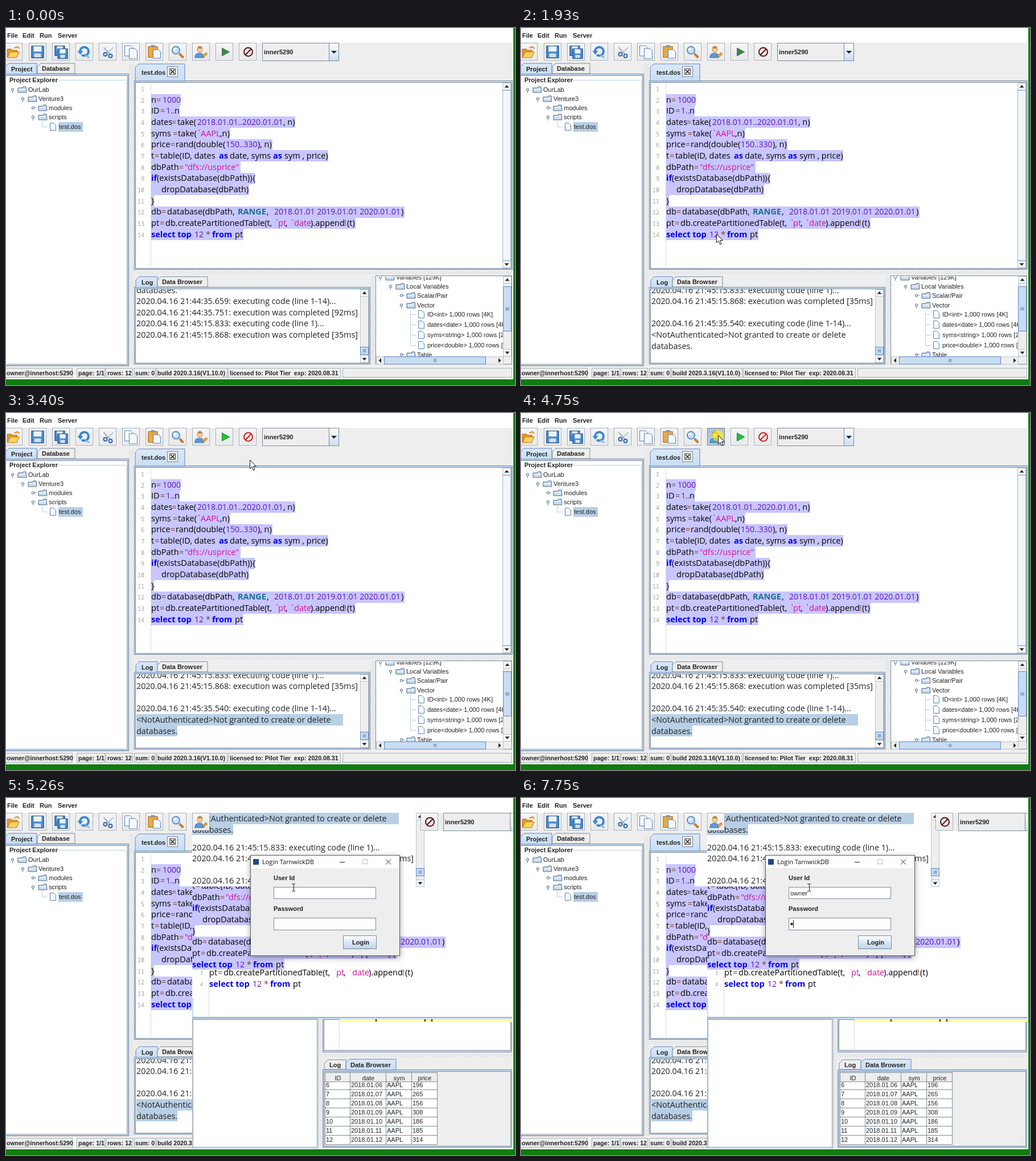
These frames come from a looping animation (894 px wide and 626 px high, 8 s). An HTML page with a canvas:

```html
<!DOCTYPE html>
<html lang="en">
<head>
<meta charset="utf-8">
<title>Code editor login</title>
<style>
html, body { margin: 0; width: 100%; height: 100%; overflow: hidden; background: #fff; }
canvas { display: block; }
</style>
</head>
<body>
<canvas id="stage" width="894" height="626"></canvas>
<script>
const g = document.getElementById('stage').getContext('2d');
const LOOP = 8000;
const FACE = '"Liberation Sans", Arial, sans-serif';
const UI = '11px ' + FACE, BOLD = 'bold ' + UI, STATUS = 'bold 10.6px ' + FACE;
const READ = '"Open Sans", "Noto Sans", sans-serif';
const MONO = '"Noto Sans Mono", "DejaVu Sans Mono", monospace';
const GREY = '#eeeeee', EDGE = '#7a8a99', PALE = '#c8ddf2', SELECT = '#b8cfe5', BLUE = '#6382bf';
const USER = 'owner';

// times of the events, in ms
const RUN = [1460, 1540], DRAG = [2310, 2550], LOGIN = [4750, 4870];
const SELECTED = 2470, REFRESH = 2310, FOCUS = 5660, LEAVE = 7220, ENTER = 7290, DOT = 7750;
const during = (t, [a, b]) => t >= a && t < b;

// ---------- drawing helpers ----------
function fill(x, y, w, h, color) { g.fillStyle = color; g.fillRect(x, y, w, h); }
function box(x, y, w, h, color, edge = EDGE) {
  if (color) fill(x, y, w, h, color);
  g.strokeStyle = edge; g.lineWidth = 1;
  g.strokeRect(x + .5, y + .5, w - 1, h - 1);
}
function text(s, x, y, font = UI, color = '#222', align = 'left') {
  g.font = font; g.fillStyle = color; g.textAlign = align;
  g.fillText(s, x, y);
}
function poly(pts, color, edge, width = 1) {
  g.beginPath();
  for (let i = 0; i < pts.length; i += 2) g.lineTo(pts[i], pts[i + 1]);
  if (color) { g.closePath(); g.fillStyle = color; g.fill(); }
  if (edge) { g.strokeStyle = edge; g.lineWidth = width; g.stroke(); }
}
function disc(x, y, r, color, edge, width = 1) {
  g.beginPath(); g.arc(x, y, r, 0, 7);
  if (color) { g.fillStyle = color; g.fill(); }
  if (edge) { g.strokeStyle = edge; g.lineWidth = width; g.stroke(); }
}
function shade(y, h, top, bottom) {
  const s = g.createLinearGradient(0, y, 0, y + h);
  s.addColorStop(0, top); s.addColorStop(1, bottom);
  return s;
}
function clip(x, y, w, h, draw) {
  g.save(); g.beginPath(); g.rect(x, y, w, h); g.clip();
  draw(); g.restore();
}
function at(x, y, draw) { g.save(); g.translate(x, y); draw(); g.restore(); }

const bumps = (() => {
  const tile = document.createElement('canvas');
  tile.width = tile.height = 4;
  const p = tile.getContext('2d');
  p.fillStyle = GREY; p.fillRect(0, 0, 4, 4);
  p.fillStyle = '#fff'; p.fillRect(0, 0, 1, 1); p.fillRect(2, 2, 1, 1);
  p.fillStyle = '#a9b4bf'; p.fillRect(1, 1, 1, 1); p.fillRect(3, 3, 1, 1);
  return g.createPattern(tile, 'repeat');
})();

// ---------- toolbar icons, centred on 0,0 ----------
function page(x, y, w, h) {
  poly([x, y, x + w - 4, y, x + w, y + 4, x + w, y + h, x, y + h, x, y], '#f4f9ff', '#5a82b4');
}
function floppy(x, y, s) {
  box(x, y, s, s, '#4a8acb', '#1f4d86');
  fill(x + 4, y + 1, s - 8, s * .42, '#eaf3fc');
  fill(x + 5, y + s * .62, s - 10, s * .3, '#d5dfea');
}
const icons = [
  () => {
    poly([-11, 9, -11, -5, -4, -5, -2, -3, 6, -3, 6, 9], '#e89b25', '#a8660c');
    poly([-11, 10, -6, 0, 10, 0, 5, 10, -11, 10], '#ffd163', '#b87912');
    poly([1, -7, 7, -9, 10, -6], null, '#e88a10', 2);
  },
  () => floppy(-11, -11, 22),
  () => { floppy(-11, -11, 18); floppy(-6, -6, 18); },
  () => {
    g.beginPath(); g.arc(0, -1, 7.5, Math.PI, 2.2); g.strokeStyle = '#3d87d2'; g.lineWidth = 4; g.stroke();
    poly([-12, -2, -2, -2, -7, 5], '#3d87d2');
    poly([2, 6, 9, 10], null, '#8db8e4', 3);
  },
  () => {
    poly([-7, -8, 5, 5], null, '#8a9caf', 1.5); poly([10, -8, -2, 3], null, '#a5b4c4', 1.5);
    disc(-4, 4, 3, null, '#3568a8', 2); disc(5, 7, 3, null, '#3568a8', 2);
  },
  () => { page(-11, -11, 14, 18); page(-3, -6, 14, 18); },
  () => {
    box(-11, -10, 17, 20, '#eaa942', '#a86d16');
    fill(-6, -12, 7, 4, '#8a97a6'); page(-2, -4, 13, 15);
  },
  () => {
    poly([3, 3, 10, 10], null, '#c77d28', 4);
    disc(-3, -3, 6.5, '#c4e2fa', '#5b8fc4', 2); disc(-5, -5, 2.5, '#fff');
  },
  () => {
    poly([-11, 10, -9, 4, -4, 2, 2, 3, 5, 10], '#5b9ad8', '#3a70ab');
    disc(-2, -4, 4.5, '#f7cf9c', '#bb8440');
    g.beginPath(); g.arc(-2, -6, 4.5, Math.PI, 0); g.fillStyle = '#c58a35'; g.fill();
    poly([3, 6, 9, 1, 11, 4, 5, 9], '#f0a83c', '#b56e14');
  }
];
function play(bright) {
  poly([-4, -7, 9, 0, -4, 7, -4, -7], bright ? '#27bf35' : '#3a8a3d', bright ? '#128a20' : '#59695a');
}
function stop(bright) {
  const c = bright ? '#cf2020' : '#5d1616';
  disc(1, 0, 7.5, '#f3e9e6', c, 2); poly([-4, 5, 6, -5], null, c, 2);
}
function button(x, draw, mouse, pressed) {
  const over = mouse && mouse[0] >= x && mouse[0] < x + 31 && mouse[1] >= 26 && mouse[1] < 58;
  box(x, 26, 31, 31, pressed ? shade(26, 31, '#a9c0d8', '#bccfe2') : shade(26, 31, '#f5f6f8', '#e6e8eb'), over ? EDGE : '#a3aab2');
  if (!pressed) box(x + 1, 27, 29, 29, null, over ? SELECT : '#fafafa');
  at(x + 15.5, 42, draw);
}
function combo(x) {
  box(x, 26, 135, 32, GREY);
  box(x + 117, 26, 18, 32, shade(26, 32, '#fff', PALE));
  poly([x + 121, 40, x + 131, 40, x + 126, 45], '#222');
  text('inner5290', x + 3, 46, BOLD);
}

// ---------- widgets ----------
function tab(x, y, w, h, label, tx, on) {
  poly([x, y + h, x, y + 6, x + 6, y, x + w, y, x + w, y + h], on ? shade(y, h, '#dbe9f7', PALE) : GREY, on ? BLUE : EDGE);
  text(label, tx, y + h / 2 + 4, BOLD);
}
function panel(x, y, w, h, color = '#fff') {
  box(x, y, w, h, PALE, EDGE);
  box(x + 2, y + 3, w - 4, h - 5, color, EDGE);
}
function arrow(x, y, dx, dy) {
  poly([x + dx * 2.5, y + dy * 2.5, x - dx * 2 - dy * 4, y - dy * 2 - dx * 4, x - dx * 2 + dy * 4, y - dy * 2 + dx * 4], '#222');
}
function thumb(x, y, w, h) {
  box(x, y, w, h, PALE, BLUE);
  const cx = x + w / 2 | 0, cy = y + h / 2 | 0;
  for (let i = -2; i < 4; i += 2) w > h ? fill(cx + i, y + 4, 1, h - 8, BLUE) : fill(x + 4, cy + i, w - 8, 1, BLUE);
}
function vbar(x, y, h, a, b) {
  box(x, y, 15, h, GREY, '#b9c4cf');
  box(x, y, 15, 13, '#f5f8fb', '#b9c4cf'); box(x, y + h - 13, 15, 13, '#f5f8fb', '#b9c4cf');
  arrow(x + 7.5, y + 6.5, 0, -1); arrow(x + 7.5, y + h - 6.5, 0, 1);
  if (b) thumb(x, a, 15, b - a);
}

// ---------- trees ----------
function folder(x, y) {
  poly([x, y + 5, x, y - 3, x + 8, y - 3, x + 9, y - 5, x + 14, y - 5, x + 15, y + 5, x, y + 5], PALE, '#52637c');
  fill(x + 1, y - 1, 13, 1, '#fff');
}
function branch(x, y, label, open) {
  const hx = x - 28;
  open ? fill(hx, y, 1, 6, BLUE) : fill(hx, y - .5, 6, 1, BLUE);
  disc(hx + .5, y, 2.2, '#e6f0fa', '#4a668f');
  folder(x - 18, y);
  text(label, x, y + 4);
}
function leaf(x, y, label, up, on) {
  poly([x - 29.5, y - up, x - 29.5, y + .5, x - 20, y + .5], null, SELECT);
  page(x - 15.5, y - 6.5, 10, 13);
  if (on) fill(x - 1, y - 8, 43, 17, SELECT);
  text(label, x, y + 4);
}

// ---------- code: right edge of the row, then style + x + text ----------
const rows = [
  [307, 'k255:n|o264:=|p275:1000'],
  [305, 'k255:ID|o271:=|p281:1..|k296:n'],
  [508, 'k255:dates|o291:=|k301:take(|p336:2018.01.01..2020.01.01|k487:, n)'],
  [394, 'k255:syms|o293:=|k302:take(|s335:`|s342:AAPL|k376:,n)'],
  [468, 'k255:price|o289:=|k298:rand(double(|p386:150..330|k442:), n)'],
  [566, 'k255:t|o261:=|k271:table(ID, dates|b374:as|k393:date, syms|b469:as|k489:sym , price)'],
  [412, 'k255:dbPath|o304:=|s314:"dfs://usprice"'],
  [437, 'b255:if|k265:(existsDatabase(dbPath)){'],
  [427, 'k273:dropDatabase(dbPath)'],
  [260, 'k255:}'],
  [700, 'k255:db|o273:=|k283:database(dbPath,|t407:RANGE|k458:,|p471:2018.01.01 2019.01.01 2020.01.01|k694:)'],
  [614, 'k255:pt|o270:=|k280:db.createPartitionedTable(t,|s472:`|s478:pt|k491:,|s499:`|s506:date|k535:).append|o594:!|k599:(t)'],
  [417, 'b255:select top|p331:12|o351:*|b362:from|k402:pt']
];
const ink = { k: '#000', o: '#80401c', p: '#6010c4', s: '#d4109c', b: '#0000ee', t: '#1b6f94' };
const rowY = n => 125.7 + 19.67 * (n - 2);
function code(first, selected) {
  for (let n = first; n <= 14; n++) {
    const [end, parts] = rows[n - 2], y = rowY(n);
    if (selected) fill(255, Math.round(y - 9.8), end - 255, 20, '#c8c6ff');
    for (const part of parts.split('|')) {
      const [, style, x, s] = part.match(/^(\w)(\d+):(.*)$/);
      const weight = 'bt'.includes(style) ? 'bold ' : '';
      text(s, +x, Math.round(y + 5), weight + (style === 'p' ? 14 : 14.5) + 'px ' + READ, ink[style]);
    }
  }
}

// ---------- log ----------
const stamp = '2020.04.16 21:';
const ran = [stamp + '45:15.833: executing code (line 1)...', stamp + '45:15.868: execution was completed [35ms]'];
const before = ['databases.', stamp + '44:35.659: executing code (line 1-14)...',
  stamp + '44:35.751: execution was completed [92ms]', ...ran];
const after = [...ran, '', stamp + '45:35.540: executing code (line 1-14)...',
  '<NotAuthenticated>Not granted to create or delete', 'databases.'];
function log(lines, sel) {
  if (sel) {
    const [x, y] = sel;
    if (y < 548) { fill(x, 528, 592 - x, 20, SELECT); fill(229, 547, 72, 20, SELECT); }
    else if (x < 301) fill(x, 547, 301 - x, 20, SELECT);
  }
  lines.forEach((s, i) => text(s, 229, Math.round(464.5 + 19.6 * i), '14.35px ' + READ));
}

// ---------- main window ----------
function mainWindow(t, mouse, sel) {
  fill(0, 0, 894, 626, '#107c10');
  fill(0, 0, 891, 616, '#fff');
  fill(0, 26, 889, 588, GREY);
  [['File', 2], ['Edit', 29], ['Run', 59], ['Server', 91]].forEach(m => text(m[0], m[1], 17, BOLD));

  const bright = t >= REFRESH;
  icons.forEach((draw, i) => button(i ? 40 + 41 * (i - 1) : -2, draw, mouse, i === 8 && during(t, LOGIN)));
  button(368, () => play(bright), mouse, during(t, RUN));
  button(409, () => stop(bright), mouse);
  combo(450);

  panel(-3, 80, 219, 513);
  tab(-1, 62, 55, 19, 'Project', 9, true);
  tab(55, 62, 66, 18, 'Database', 63);
  poly([90, 91.5, 211.5, 91.5, 211.5, 588.5, 2, 588.5], null, SELECT);
  text('Project Explorer', 6, 95, BOLD);
  branch(39, 108, 'OurLab', true);
  branch(57, 124, 'Venture3', true);
  branch(75, 140, 'modules');
  branch(75, 156, 'scripts', true);
  leaf(93, 173, 'test.dos', 10, true);

  fill(217, 62, 7, 530, bumps);
  panel(225, 92, 665, 332);
  tab(227, 63, 87, 30, 'test.dos', 238, true);
  box(283, 67, 19, 19, GREY); box(287, 71, 11, 11, null, '#444');
  poly([289, 73, 296, 80], null, '#222', 1.5); poly([296, 73, 289, 80], null, '#222', 1.5);
  fill(254, 97, 1, 323, '#dcdcdc');
  for (let n = 1; n <= 14; n++) text(n, 243, Math.round(rowY(n) + 5), '10px ' + MONO, '#a0a0a0', 'right');
  code(2, true);
  vbar(872, 96, 325);
  box(872, 109, 15, 299, '#f3f6f9', '#9fb8d3');

  fill(226, 426, 663, 7, bumps);
  panel(225, 454, 415, 136);
  tab(228, 436, 38, 19, 'Log', 238, true);
  tab(266, 436, 88, 18, 'Data Browser', 274);
  clip(228, 458, 394, 129, () => log(t < RUN[1] ? before : after, sel));
  vbar(622, 458, 129, 559, 573);

  fill(641, 434, 7, 156, bumps);
  box(649, 434, 240, 156, GREY);
  fill(650, 435, 224, 141, '#fff');
  clip(651, 436, 222, 140, () => {
    branch(685, 437, 'Variables [129K]', true);
    branch(703, 453, 'Local Variables', true);
    branch(722, 469, 'Scalar/Pair');
    branch(722, 486, 'Vector', true);
    ['ID<int> 1,000 rows [4K]', 'dates<date> 1,000 rows [4K]', 'syms<string> 1,000 rows [2K]', 'price<double> 1,000 rows [8K]']
      .forEach((s, i) => leaf(740, 502 + 18 * i, s, i ? 18 : 8));
    branch(722, 573, 'Table');
  });
  vbar(873, 435, 141, 453, 532);
  box(650, 576, 224, 14, GREY, '#b9c4cf');
  arrow(657, 583, -1, 0); arrow(867, 583, 1, 0);
  thumb(664, 576, 179, 14);

  fill(0, 594, 889, 20, '#f2f2f2');
  [[USER + '@innerhost:5290', -2, 119, 1], ['page: 1/1', 124, 50, 127], ['rows: 12', 175, 48, 178], ['sum: 0', 225, 38, 227],
    ['build 2020.3.16(V1.10.0)', 264, 125, 266], ['licensed to: Pilot Tier  exp: 2020.08.31', 390, 198, 393], ['', 591, 298, 0]]
    .forEach(([s, x, w, tx]) => { box(x, 596, w, 17, GREY, '#a6adb5'); text(s, tx, 609, STATUS); });
}

// ---------- leftovers of other windows behind the dialog ----------
function overlap() {
  fill(327, 0, 564, 614, '#fff');
  const whole = [229, 540];
  clip(327, 26, 393, 54, () => at(98, -502, () => log(after, whole)));
  clip(327, 80, 393, 76, () => at(98, -373, () => log(after)));
  vbar(720, 26, 130, 123, 137);
  fill(735, 26, 154, 32, GREY);
  button(327, icons[8]);
  button(728, () => stop(false));
  clip(760, 26, 130, 32, () => combo(768));
  clip(327, 155, 562, 146, () => at(72, -70, () => code(7, true)));
  clip(327, 301, 562, 84, () => {
    fill(356, 301, 1, 84, '#dcdcdc');
    text('3', 341, 310, '8px ' + MONO, '#999');
    text('4', 341, 330, '8px ' + MONO, '#999');
    at(102, -36, () => code(13));
  });
  fill(327, 351, 2, 34, PALE);
  fill(327, 384, 562, 4, PALE); fill(327, 384, 562, 1, EDGE);

  fill(327, 388, 562, 226, GREY);
  box(327, 387, 221, 227, '#fff'); box(329, 388, 217, 224, null, SELECT);
  fill(549, 389, 6, 224, bumps);
  box(556, 388, 333, 58, PALE); box(558, 388, 329, 55, '#fff');
  fill(585, 389, 1, 54, '#dcdcdc');
  fill(586, 388, 303, 5, '#ffffa0');
  [649, 735, 747].forEach(x => fill(x, 388, 2, 4, '#222'));
  fill(556, 449, 333, 6, bumps);
  panel(556, 476, 333, 137, GREY);
  tab(559, 459, 38, 17, 'Log', 568);
  tab(597, 458, 88, 19, 'Data Browser', 605, true);
  const cols = [560, 604, 667, 712, 757], heads = ['ID', 'date', 'sym', 'price'];
  clip(559, 498, 199, 111, () => {
    fill(560, 498, 197, 110, '#fff');
    [196, 265, 156, 308, 186, 185, 314].forEach((price, i) => {
      const y = 503 + 16 * i, id = 6 + i;
      [id, '2018.01.' + String(id).padStart(2, '0'), 'AAPL', price].forEach((s, k) => text(s, cols[k] + 2, y + 4));
      fill(560, y + 8, 197, 1, EDGE);
    });
    cols.forEach(x => fill(x, 498, 1, 110, EDGE));
  });
  heads.forEach((s, k) => {
    box(cols[k], 481, cols[k + 1] - cols[k] + 1, 17, GREY);
    text(s, (cols[k] + cols[k + 1]) / 2 + 1, 495, UI, '#222', 'center');
  });
}

// ---------- dialog ----------
const keyTimes = [5980, 6130, 6510, 6590, 6670];
function dialog(t) {
  g.save();
  g.shadowColor = 'rgba(0,0,0,.35)'; g.shadowBlur = 10; g.shadowOffsetY = 3;
  fill(429, 100, 263, 177, GREY);
  g.restore();
  box(429, 100, 263, 177, GREY, '#5c5c5c');
  fill(430, 101, 261, 22, '#fff');
  fill(434, 107, 10, 10, '#1f4a8c');
  text('Login TarnwickDB', 450, 116, '11px ' + READ, '#111');
  fill(586, 112, 9, 1, '#222');
  box(626, 107, 9, 9, null, '#c0c0c0');
  poly([667, 107.5, 676, 116.5], null, '#222'); poly([676, 107.5, 667, 116.5], null, '#222');
  text('User Id', 470, 144, BOLD); box(470, 156, 180, 21, '#fff');
  text('Password', 470, 198, BOLD); box(470, 210, 180, 22, '#fff');
  box(592, 241, 59, 24, shade(241, 24, '#fdfeff', '#bcd2e8'));
  text('Login', 608, 257, BOLD);

  const typed = USER.slice(0, keyTimes.filter(k => t >= k).length);
  text(typed, 473, 171);
  if (during(t, [FOCUS, LEAVE])) fill(472 + Math.round(g.measureText(typed).width), 159, 1, 15, '#222');
  if (t >= DOT) disc(475.5, 221, 2.3, '#333');
  if (t >= ENTER) fill(t >= DOT ? 478 : 472, 214, 1, 14, '#222');
}

// ---------- pointer: start, end, steps, x, y ----------
const moves = [
  [70, 530, 7, 376, 30], [760, 910, 3, 385, 41], [1540, 2240, 10, 315, 574],
  [2310, 2470, 3, 239, 542], [2550, 2780, 4, 212, 530], [3100, 3400, 5, 428, 82],
  [3480, 3560, 2, 381, 20], [3710, 4090, 6, 346, 39], [4870, 5260, 6, 505, 157], [5520, 5520, 1, 506, 157]
];
function pointer(t) {
  let x = 842, y = 710;
  for (const [t0, t1, n, tx, ty] of moves) {
    if (t < t0) break;
    const gap = n > 1 ? (t1 - t0) / (n - 1) : 1;
    const k = Math.min(1, (Math.floor((t - t0) / gap + .05) + 1) / n);
    x += (tx - x) * k; y += (ty - y) * k;
  }
  return [Math.round(x), Math.round(y)];
}
function drawPointer(t, x, y) {
  if ([RUN, DRAG, LOGIN].some(span => during(t, span))) disc(x, y + 1, 10, 'rgba(255,250,0,.62)');
  if (t >= 5180) {
    poly([x - 3, y - 6.5, x, y - 6, x + 3, y - 6.5], null, '#222');
    poly([x - 3, y + 6.5, x, y + 6, x + 3, y + 6.5], null, '#222');
    fill(x, y - 6, 1, 12, '#222');
    return;
  }
  at(x + .5, y + .5, () =>
    poly([0, 0, 0, 15, 3.5, 12, 6, 18, 8.5, 17, 6, 11, 11, 11, 0, 0], '#fff', '#111'));
}

function frame() {
  const t = performance.now() % LOOP;
  const mouse = pointer(t), [x, y] = mouse;
  let sel = null;
  if (t >= SELECTED) sel = [229, 540];
  else if (t >= DRAG[0]) sel = [Math.max(229, x), y];
  mainWindow(t, mouse, sel);
  if (t >= LOGIN[1]) { overlap(); dialog(t); }
  drawPointer(t, x, y);
  requestAnimationFrame(frame);
}
frame();
</script>
</body>
</html>
```
